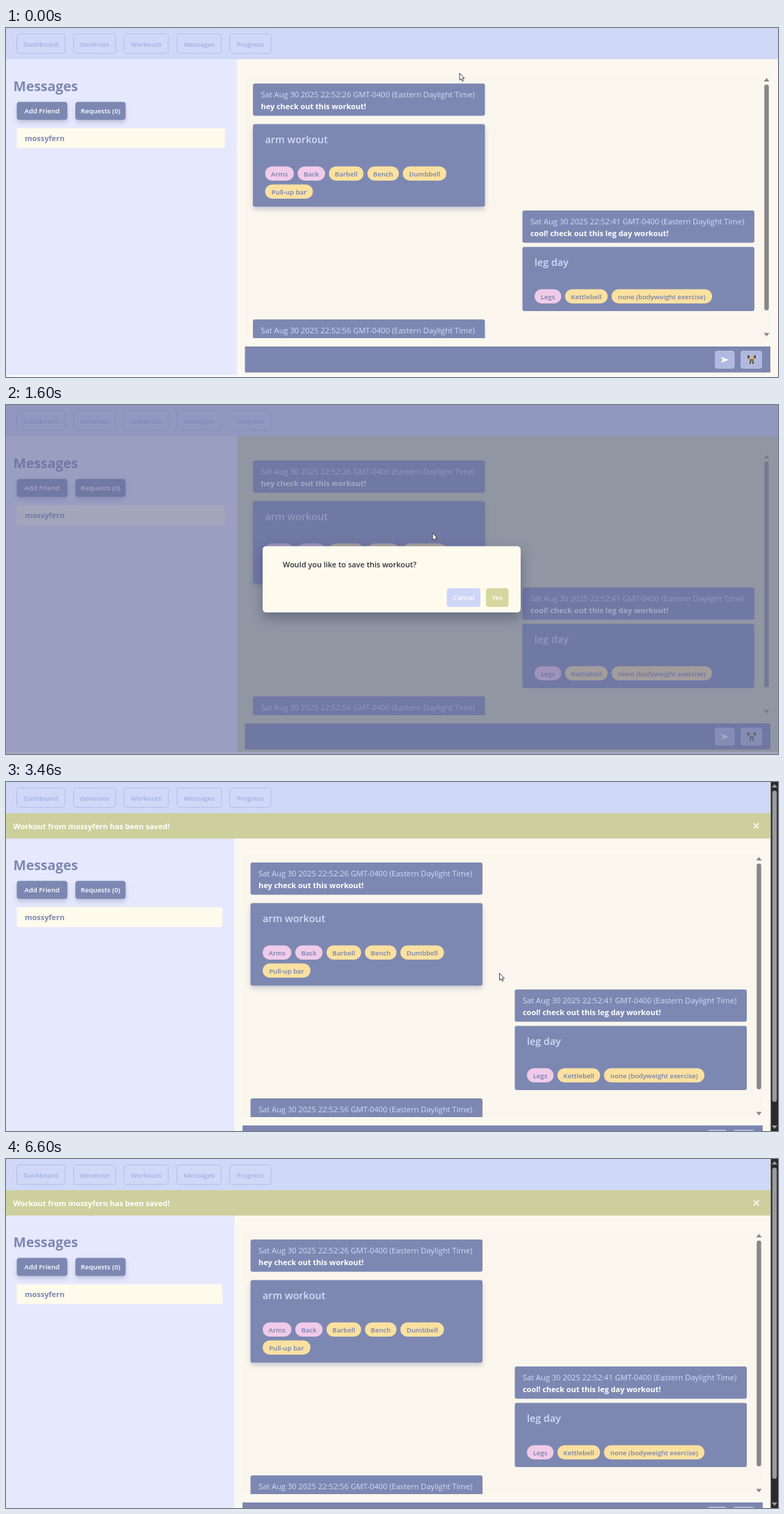
An HTML page that plays this animation: 1113x503 px, repeating every 6.67 s.

```html
<!DOCTYPE html>
<html lang="en">
<head>
<meta charset="utf-8">
<title>Workout messages</title>
<style>
  html, body { margin: 0; width: 100%; height: 100%; overflow: hidden; background: #fcf8ef; }
  svg { display: block; width: 1113px; height: 503px; }
  text { font-family: "Open Sans", "Noto Sans", sans-serif; white-space: pre; }
  .raised { filter: drop-shadow(0 4px 3px rgba(90, 98, 150, .28)); }
  .dialog { filter: drop-shadow(0 8px 9px rgba(40, 45, 85, .4)); }
</style>
</head>
<body>
<svg id="stage" viewBox="0 0 1113 503"></svg>
<script>
const LOOP = 6670, TICK = 200 / 3;
const SLATE = '#7d88b2', LILAC = '#d3daf8', PINK = '#f0cbe9', YELLOW = '#fbe1a0';
const USER = 'mossyfern';

const rect = (x, y, w, h, fill, r = 0, extra = '') =>
  `<rect x="${x}" y="${y}" width="${w}" height="${h}" rx="${r}" fill="${fill}" ${extra}/>`;
const text = (x, y, size, weight, fill, str, anchor = 'start') =>
  `<text x="${x}" y="${y}" font-size="${size}" font-weight="${weight}" fill="${fill}" text-anchor="${anchor}">${str}</text>`;
const path = (d, fill, extra = '') => `<path d="${d}" fill="${fill}" ${extra}/>`;
const shift = (x, y, body) => `<g transform="translate(${x} ${y})">${body}</g>`;

const button = (x, y, w, h, fill, label, extra = '') =>
  rect(x, y, w, h, fill, 4, extra) + text(x + w / 2, y + h / 2 + 3.7, 9.7, 600, '#fff', label, 'middle');
const chip = (x, y, w, fill, label) =>
  rect(x, y, w, 20.5, fill, 10.2) + text(x + w / 2, y + 14, 9.6, 600, '#7480ad', label, 'middle');
const message = (x, y, clock, body) =>
  rect(x, y, 334.5, 46.5, SLATE, 3) +
  text(x + 11.5, y + 19.5, 11.14, 400, LILAC, `Sat Aug 30 2025 ${clock} GMT-0400 (Eastern Daylight Time)`) +
  text(x + 11.5, y + 37, 10.95, 700, '#fff', body);
const card = (x, y, h, title, id, extra = '') =>
  rect(x, y, 334.5, h, SLATE, 3, `id="${id}" ${extra}`) + text(x + 17.5, y + 27.5, 14.4, 600, LILAC, title);
const scrollbar = (x, top, bottom, thumbEnd, w, fill) =>
  path(`M${x - 4} ${top + 5}l4-5 4 5z`, fill) + path(`M${x - 4} ${bottom - 5}l4 5 4-5z`, fill) +
  rect(x - w / 2, top + 9.5, w, thumbEnd - top - 9.5, fill, w / 2);

function header(width) {
  const tabs = [[15.5, 69.5, 'Dashboard'], [97.5, 60.5, 'Generate'], [170.5, 63.5, 'Workouts'],
                [246.5, 64, 'Messages'], [322.5, 59.5, 'Progress']];
  return rect(0, 0, width, 45, '#d0d8f7') + tabs.map(([x, w, label]) =>
    rect(x, 8.5, w, 28, 'none', 3, 'stroke="#a5b0e6" stroke-dasharray="2 1"') +
    text(x + w / 2, 26.5, 9.55, 600, '#a5b0e6', label, 'middle')).join('');
}

function sidebar(width) {
  return rect(0, 45, width, 460, '#e6e9fd') +
    text(10.5, 91, 19.5, 700, SLATE, 'Messages') +
    button(15.5, 106.5, 73, 26, SLATE, 'Add Friend', 'class="raised"') +
    button(100, 106.5, 72.5, 26, SLATE, 'Requests (0)', 'class="raised"') +
    rect(15.5, 144.5, width - 33, 28.5, '#fefbec', 2) +
    text(27, 163, 10.95, 700, SLATE, USER);
}

function leftThread(id) {
  return message(356, 80, '22:52:26', 'hey check out this workout!') +
    card(356, 138.5, 119, 'arm workout', id, 'class="raised"') +
    chip(373.5, 199.5, 41.5, PINK, 'Arms') + chip(420.5, 199.5, 39.5, PINK, 'Back') +
    chip(465.5, 199.5, 50, YELLOW, 'Barbell') + chip(521, 199.5, 45.5, YELLOW, 'Bench') +
    chip(572, 199.5, 63, YELLOW, 'Dumbbell') + chip(373.5, 225.5, 69, YELLOW, 'Pull-up bar') +
    message(356, 420, '22:52:56', '');
}

function rightThread(id) {
  return message(744.5, 263, '22:52:41', 'cool! check out this leg day workout!') +
    card(744.5, 315.5, 92.5, 'leg day', id) +
    chip(762, 376.5, 38.5, PINK, 'Legs') + chip(806, 376.5, 61.5, YELLOW, 'Kettlebell') +
    chip(873, 376.5, 145, YELLOW, 'none (bodyweight exercise)');
}

function inputButtons() {
  const lifter = rect(1069, 473.5, 11, 1, '#555b70') +
    rect(1069, 471.5, 2.5, 5, '#4d4b50', 1) + rect(1078.5, 471.5, 2.5, 5, '#4d4b50', 1) +
    `<circle cx="1075" cy="475" r="2.3" fill="#e5bd5c"/>` +
    rect(1072, 477, 6, 4, '#87704d', 1) + rect(1072, 481, 2, 3, '#4d4b50') + rect(1076, 481, 2, 3, '#4d4b50');
  return rect(1022, 465, 28.5, 26, '#b1b9df', 4) + path('M1031 474l11 4.3-11 4.3 2-4.3z', '#fff') +
    rect(1059, 465, 31, 26, '#b1b9df', 4) + lifter;
}

// The saved page is pushed down by the banner and narrowed by the window scrollbar.
function page(id, dxLeft, dxRight) {
  const x = 345 + dxLeft, right = 1102 + dxRight;
  return rect(333 + dxLeft, 45, 790, 460, '#fcf8ef') +
    rect(x, 69, right - x, 378, '#faf6ed') +
    rect(333 + dxLeft, 45, 790, 460, '#cfd2ad', 0, `id="${id}Shade" visibility="hidden"`) +
    sidebar(333 + dxLeft) +
    `<clipPath id="${id}Clip"><rect x="330" y="60" width="783" height="387"/></clipPath>` +
    `<g clip-path="url(#${id}Clip)">` + shift(dxLeft, 0, leftThread(id + 'Arm')) +
    shift(dxRight, 0, rightThread(id + 'Leg')) + '</g>' +
    shift(dxRight, 0, scrollbar(1096.5, 72, 444.5, 407, 6.5, '#878787')) +
    rect(x - .5, 459, right - x + .5, 37.5, '#7c86b0') + shift(dxRight, 0, inputButtons());
}

const chatView = page('chat', 0, 0) + header(1113) + rect(0, 500, 1113, 3, '#fafafc');
const savedView = shift(0, 36, page('saved', -3.5, -11)) + header(1102) +
  rect(0, 45, 1102, 36.5, '#cdcf9c') +
  text(10.5, 67.7, 10.9, 700, '#fff', `Workout from ${USER} has been saved!`) +
  path('M1078 59.5l7.5 7.5m0-7.5l-7.5 7.5', 'none', 'stroke="#fff" stroke-width="1.7"') +
  rect(1102.5, 0, 10.5, 503, '#2a2a2b') + scrollbar(1108, 3, 500, 461, 6.5, '#9b9b9b');
const dialogView = rect(0, 0, 1113, 503, 'rgba(104,110,156,.6)') +
  rect(370, 203.5, 372, 95.5, '#fefbee', 5, 'class="dialog"') +
  text(399, 234, 10.97, 600, '#30333c', 'Would you like to save this workout?') +
  button(635.5, 264, 48.5, 27, '#ced6f8', 'Cancel') +
  button(692, 264, 32.5, 27, '#d5d79f', 'Yes', 'id="yes"');

const stage = document.getElementById('stage');
stage.innerHTML = `<g id="chat">${chatView}</g><g id="dialog">${dialogView}</g><g id="saved">${savedView}</g>` +
  path('M0 0V10.2L2.3 8.2 3.9 11.6 5.4 10.9 3.9 7.6H7z', '#fff',
       'id="cursor" stroke="#33343c" stroke-width=".9" stroke-linejoin="round"');

const $ = id => document.getElementById(id);
const show = (id, on) => $(id).setAttribute('visibility', on ? 'visible' : 'hidden');
const progress = (t, from, to) => {
  const p = Math.min(1, Math.max(0, (t - from) / (to - from)));
  return p * p * (3 - 2 * p);
};
const mix = (a, b, p) => a + (b - a) * p;

function cursorAt(t) {
  if (t >= 4200) return [689, 203.5];
  if (t >= 2790) {
    const p = progress(t, 2800, 3070);
    return [mix(615, 711.5, p), mix(184.5, 275.5, p)];
  }
  const p = progress(t, 0, 735);
  return [mix(654, 615, p), mix(65, 184.5, p)];
}

function draw(time) {
  const t = Math.floor((time % LOOP + 7) / TICK) * TICK;
  const saved = t >= 3460, dialog = t >= 1590 && !saved;
  show('chat', !saved);
  show('saved', saved);
  show('dialog', dialog);
  $('chatShade').setAttribute('visibility', dialog ? 'visible' : 'hidden');

  const hover = dialog ? 0 : progress(t, 460, 1000);
  $('chatArm').style.filter =
    `drop-shadow(0 ${mix(4, 5, hover)}px ${mix(3, 4.5, hover)}px rgba(80,88,145,${mix(.28, .68, hover)}))`;

  const press = progress(t, 2990, 3130);
  $('yes').setAttribute('fill',
    `rgb(${mix(213, 206, press)},${mix(215, 215, press)},${mix(159, 96, press)})`);

  show('cursor', t < 5390);
  $('cursor').setAttribute('transform', `translate(${cursorAt(t).join(' ')})`);
}

const start = performance.now();
function frame() {
  draw(performance.now() - start);
  requestAnimationFrame(frame);
}
frame();
</script>
</body>
</html>
```
